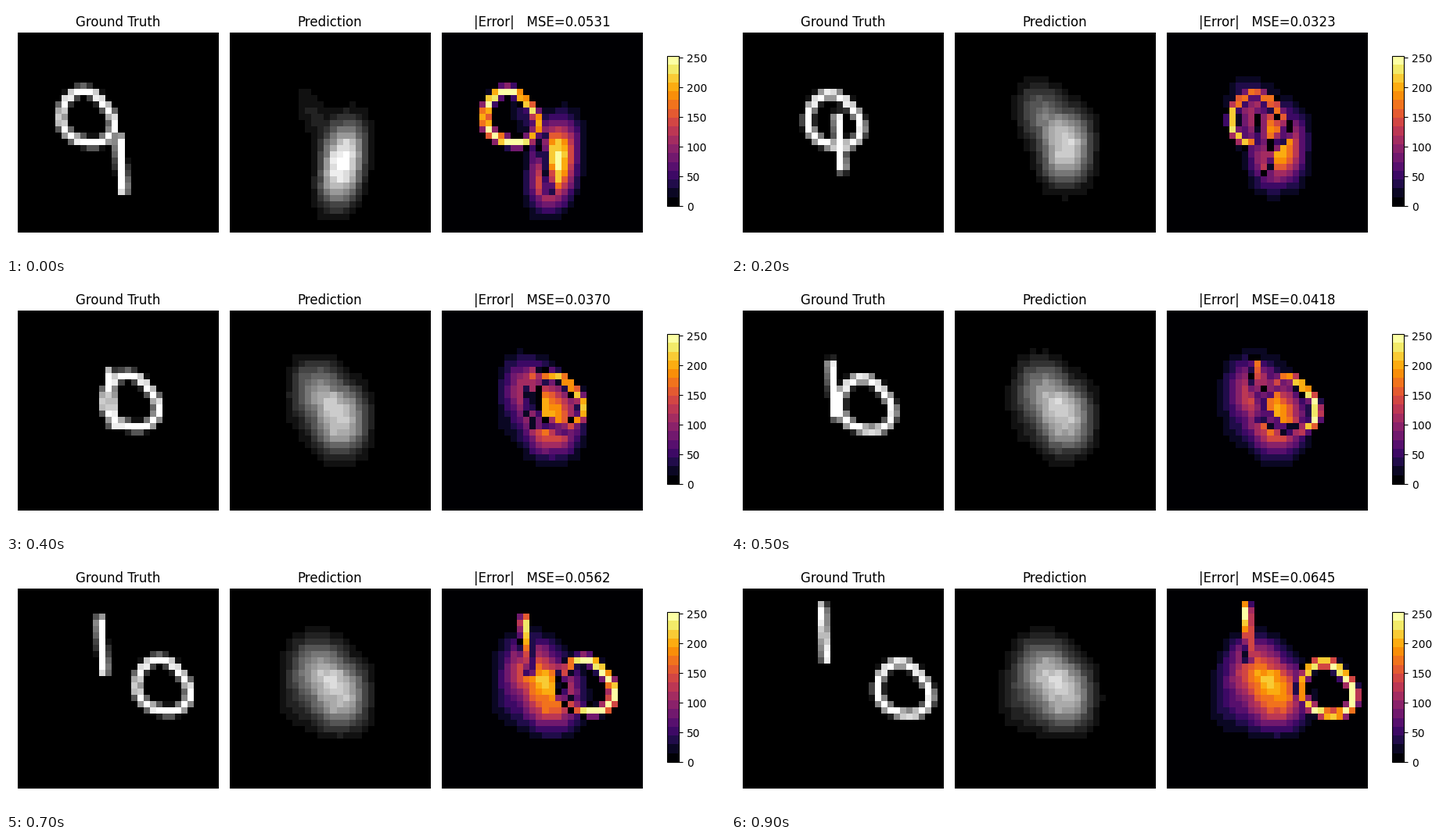
A matplotlib script for the animation above (1000 ms loop, 919x320 px).

```python
import numpy as np
import matplotlib.pyplot as plt
from matplotlib.animation import FuncAnimation
from matplotlib.colors import ListedColormap

W, H, DPI = 919, 320, 100
N = 32          # cells per panel side
FRAMES, INTERVAL = 10, 100
VMAX = 253

MSE = [0.0531, 0.0429, 0.0323, 0.0326, 0.0370,
       0.0418, 0.0473, 0.0562, 0.0644, 0.0645]

# Prediction blobs, (amp, cx, cy, sx, sy, slope) at the start and at rest.
MAIN = (250, 17.9, 20.9, 3.15, 6.2, -0.12), (178, 17.7, 17.0, 4.0, 5.0, 0)
LOBE = (36, 13.2, 12.9, 2.2, 4.0, 0.2), (118, 13.9, 12.0, 4.0, 4.3, 0)
HAZE = (0, 13.0, 16.0, 3.0, 4.0, 0), (55, 11.3, 17.2, 4.0, 5.0, 0)

fine = (np.arange(2 * N) + 0.5) / 2
FX, FY = np.meshgrid(fine, fine)
CX, CY = np.meshgrid(np.arange(N) + 0.5, np.arange(N) + 0.5)
GRAIN = np.random.default_rng(4).normal(0, 0.035, (N, N))

# Digit centrelines in cell units: a lopsided loop and a leaning stem.
angle = np.linspace(0, 2 * np.pi, 49)
radius = (4.1 + 0.38 * np.sin(2 * angle)
          + 0.22 * (np.sin(angle) + np.sin(3 * angle)))
ZERO = np.column_stack([21.5 + radius * np.cos(angle),
                        14.95 + radius * np.sin(angle)])
ONE = np.array([(13.65, 6.4), (14.3, 14.8)])


def stroke(points, dx, dy):
    """Soft stroke along a polyline shifted by half cells, pooled to cells."""
    pts = points + np.array([dx, dy]) / 2
    dist = np.full(FX.shape, np.inf)
    for (x0, y0), (x1, y1) in zip(pts[:-1], pts[1:]):
        ux, uy = x1 - x0, y1 - y0
        t = ((FX - x0) * ux + (FY - y0) * uy) / (ux * ux + uy * uy)
        t = np.clip(t, 0, 1)
        dist = np.minimum(dist, np.hypot(FX - x0 - t * ux, FY - y0 - t * uy))
    ink = np.clip((0.92 - dist) / 0.42, 0, 1)
    return 255 * ink.reshape(N, 2, N, 2).mean(axis=(1, 3))


def ground_truth(k):
    zero_x = min(np.floor(-21 + 3.5 * k), 8)       # stops at the right wall
    zero_y = np.floor(-3 + 0.63 * k)
    one_x = np.floor(5.2 - 0.75 * k)
    one_y = max(np.floor(21.5 - 3.5 * k), -7)      # stops at the top wall
    return np.maximum(stroke(ZERO, zero_x, zero_y), stroke(ONE, one_x, one_y))


def blob(ends, progress):
    start, rest = np.array(ends)
    amp, cx, cy, sx, sy, slope = start + (rest - start) * progress
    dy = CY - cy
    dx = CX - cx - slope * dy
    return amp * np.exp(-np.abs(dx / sx) ** 2.4 - np.abs(dy / sy) ** 2.4)


def prediction(k):
    settle = 1 - np.exp(-k / 2)
    total = blob(MAIN, settle) + blob(LOBE, settle) + blob(HAZE, k / 9)
    return np.clip(total * (1 + GRAIN), 0, 255)


def banded(name, levels):
    return ListedColormap(plt.get_cmap(name)(np.linspace(0, 1, levels)))


def pixel_axes(x, y, w, h):
    return fig.add_axes([x / W, 1 - (y + h) / H, w / W, h / H])


plt.rcParams["font.family"] = "DejaVu Sans"
fig = plt.figure(figsize=(W / DPI, H / DPI), dpi=DPI, facecolor="white")

images, titles = [], []
for name, left, cmap, vmax in [
        ("Ground Truth", 15, banded("gray", 16), 255),
        ("Prediction", 285.7, banded("gray", 16), 255),
        ("|Error|", 557, banded("inferno", 17), VMAX)]:
    ax = pixel_axes(left, 34, 256.5, 256)
    ax.axis("off")
    images.append(ax.imshow(np.zeros((N, N)), cmap=cmap, vmin=0, vmax=vmax,
                            interpolation="nearest", aspect="auto"))
    titles.append(ax.set_title(name, fontsize=12))

cax = fig.add_axes([0.92, 0.2, 0.016, 0.6])
fig.colorbar(images[2], cax=cax, ticks=range(0, 251, 50))
cax.tick_params(labelsize=10)


def update(k):
    truth, pred = ground_truth(k), prediction(k)
    for image, data in zip(images, (truth, pred, np.abs(truth - pred))):
        image.set_data(data)
    titles[2].set_text(f"|Error|   MSE={MSE[k]:.4f}")
    return images + titles


anim = FuncAnimation(fig, update, frames=FRAMES, interval=INTERVAL,
                     repeat=True, repeat_delay=0, blit=False)
plt.show()
```
